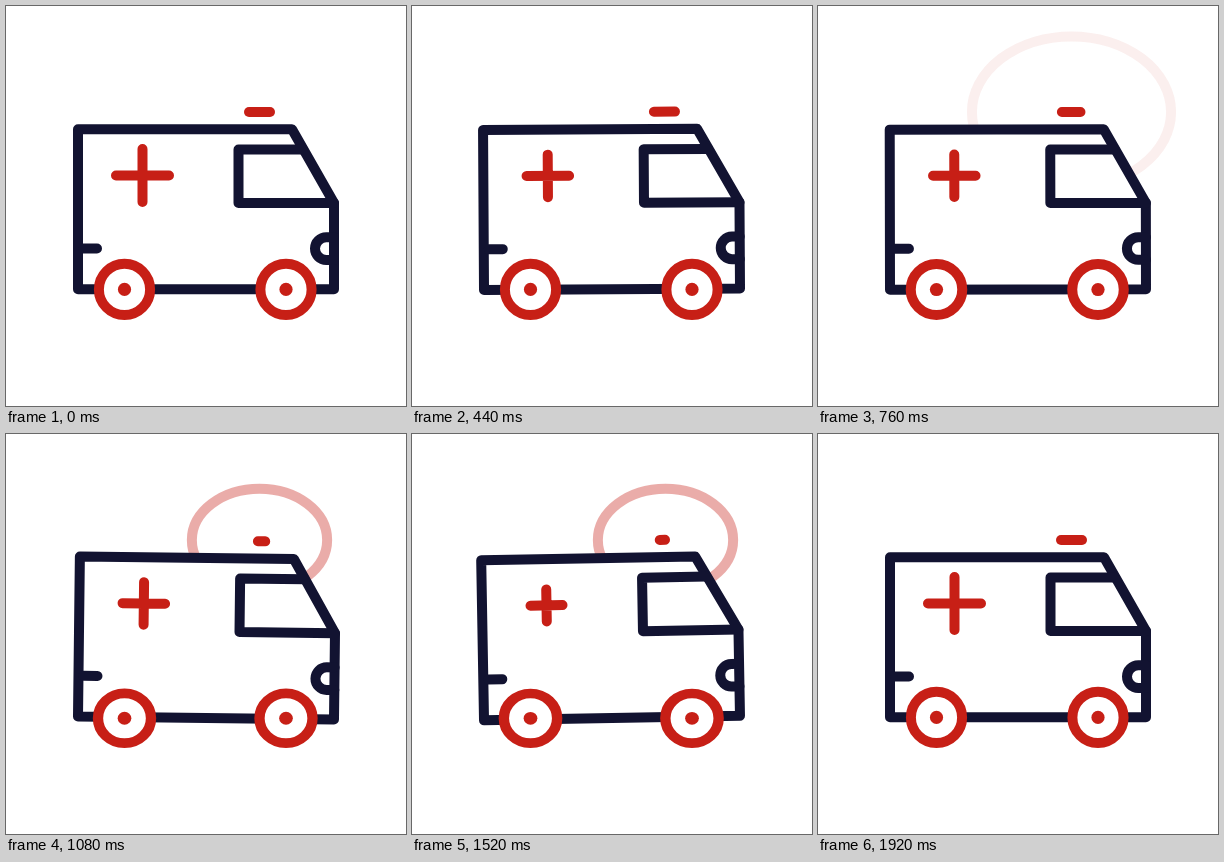
An HTML page that plays this animation: 400 by 400 pixels, repeating every 2 s.

```html
<!DOCTYPE html>
<html lang="en">
<head>
<meta charset="utf-8">
<title>Ambulance</title>
<style>
  html, body { margin: 0; width: 100%; height: 100%; overflow: hidden; background: #fff; }
  svg { display: block; width: 100%; height: 100%; }
  .line { fill: none; stroke: #121331; stroke-width: 10; stroke-linecap: round; stroke-linejoin: round; }
  .red { stroke: #c71f16; }
  .solid { fill: #fff; }
  .hub { fill: #c71f16; }
</style>
</head>
<body>
<svg viewBox="0 0 400 400">
  <ellipse id="halo" class="line red" cx="253.5" cy="106"/>
  <g id="van">
    <path class="line solid" d="M72 123.3H286L328 197V283.3H72Z"/>
    <path class="line" d="M297 143.5H232.5V197H328M77 242.5H91M328 231.3H320.3a11.3 11.3 0 0 0 0 22.6H328"/>
    <path id="cross" class="line red"/>
    <path id="lamp" class="line red"/>
  </g>
  <g class="wheel" data-x="118.5">
    <circle class="line red solid" r="25.6"/><circle class="hub" r="6.6"/>
  </g>
  <g class="wheel" data-x="280">
    <circle class="line red solid" r="25.6"/><circle class="hub" r="6.6"/>
  </g>
</svg>
<script>
const $ = id => document.getElementById(id);
const halo = $('halo'), van = $('van'), cross = $('cross'), lamp = $('lamp');
const wheels = document.querySelectorAll('.wheel');
const LOOP = 2000, STEP = 40, END = 1920, CYCLE = 960;

const ease = p => (1 - Math.cos(Math.PI * p)) / 2;

// Eased value at time t between [time, value] keys
function track(keys, t) {
  for (let i = 1; i < keys.length; i++) {
    const [t0, a] = keys[i - 1], [t1, b] = keys[i];
    if (t <= t1) return a + (b - a) * ease((t - t0) / (t1 - t0));
  }
  return keys[keys.length - 1][1];
}

const tiltKeys = [[0, 0], [200, 1.02], [600, -1.06], [800, 0]];
const squashKeys = [[0, 0], [200, 1], [400, 0], [440, 0], [620, 1], [800, 0]];
const crossKeys = [[0, 26.5], [240, 16], [640, 26.5]];

function draw(t) {
  const c = t % CYCLE;
  const tilt = track(tiltKeys, c), squash = track(squashKeys, c);

  van.setAttribute('transform', `translate(0 ${squash}) rotate(${tilt} 200 283.3)`);

  const arm = track(crossKeys, t % 640);
  cross.setAttribute('d', `M${136.5 - arm} 169.5h${2 * arm}M136.5 ${169.5 - arm}v${2 * arm}`);

  const half = 10.5 * (1 - squash) + 0.01;
  lamp.setAttribute('d', `M${253.5 - half} 106h${2 * half}`);

  // Wheels squash against the ground
  for (const w of wheels) {
    w.setAttribute('transform',
      `translate(${w.dataset.x} 314) scale(${1 + 0.055 * squash} ${1 - 0.04 * squash}) translate(0 -30.6)`);
  }

  // Two siren pulses per cycle
  const age = c < 440 ? c : c - 440;
  const grow = 1 - Math.exp(-age / 120);
  halo.setAttribute('rx', 107 * grow);
  halo.setAttribute('ry', 81.2 * grow);
  halo.setAttribute('opacity', age > 0 && age < 440 ? 1 - grow : 0);
}

const start = performance.now();
function tick() {
  const t = (performance.now() - start) % LOOP;
  draw(Math.min(Math.floor(t / STEP) * STEP, END));
  requestAnimationFrame(tick);
}
tick();
</script>
</body>
</html>
```
